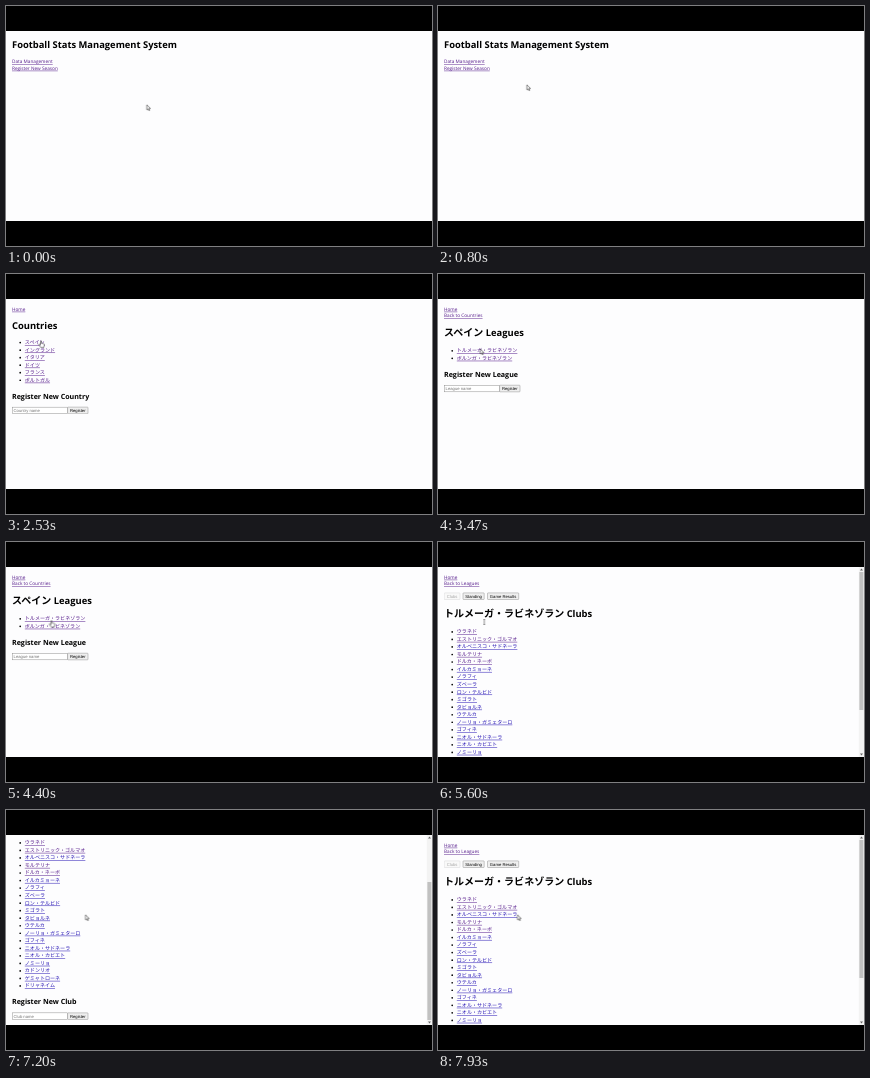
An HTML page for the animation above (8000 ms loop, 426 px wide and 240 px high).

```html
<!DOCTYPE html>
<html lang="ja">
<head>
<meta charset="utf-8">
<title>Football Stats Management System</title>
<style>
html, body { margin: 0; width: 100%; height: 100%; overflow: hidden; background: #000; }
svg { display: block; width: 100vw; height: 100vh; }
text { font-family: "Open Sans", "Noto Sans", sans-serif; fill: #111; text-rendering: geometricPrecision; white-space: pre; }
.jp { font-family: "Noto Sans CJK JP", "Noto Sans CJK", sans-serif; }
.bold { font-weight: 700; fill: #000; }
.link { fill: #2412b4; text-decoration: underline; text-decoration-thickness: .4px; }
.visited { fill: #551a8b; }
.control { font-family: "Liberation Sans", Arial, sans-serif; fill: #000; }
.hint { fill: #757575; }
.off { opacity: .35; }
.box { fill: #fff; stroke: #767676; stroke-width: .4; }
.button { fill: #efefef; }

.page, .shape { opacity: 0; animation: 8s step-end infinite; }
#home { animation-name: home; }
#countriesLoading { animation-name: countries-loading; }
#countries { animation-name: countries; }
#leaguesLoading { animation-name: leagues-loading; }
#leagues { animation-name: leagues; }
#clubsLoading { animation-name: clubs-loading; }
#clubs, #scrollbar { animation-name: clubs; }
#arrow { animation-name: arrow; }
#hand { animation-name: hand; }
#beam { animation-name: beam; }
@keyframes home { 0% { opacity: 1 } 18.5%, 100% { opacity: 0 } }
@keyframes countries-loading { 18.5% { opacity: 1 } 24% { opacity: 0 } }
@keyframes countries { 24% { opacity: 1 } 33.75% { opacity: 0 } }
@keyframes leagues-loading { 33.75% { opacity: 1 } 39% { opacity: 0 } }
@keyframes leagues { 39% { opacity: 1 } 56.5% { opacity: 0 } }
@keyframes clubs-loading { 56.5% { opacity: 1 } 62% { opacity: 0 } }
@keyframes clubs { 62%, 100% { opacity: 1 } }
@keyframes arrow { 0%, 25%, 33.75%, 71.5%, 100% { opacity: 1 } 13%, 28%, 46.5% { opacity: 0 } }
@keyframes hand { 13%, 28%, 46.5% { opacity: 1 } 18.5%, 33.75%, 56.5% { opacity: 0 } }
@keyframes beam { 18.5%, 56.5% { opacity: 1 } 25%, 71.5% { opacity: 0 } }

#cursor { animation: move 8s ease-in-out infinite; }
@keyframes move {
  0%, 6% { transform: translate(140.8px, 98.8px) }
  14%, 24% { transform: translate(37.5px, 59px) }
  29%, 36% { transform: translate(35px, 66.8px) }
  48%, 56.5% { transform: translate(45.5px, 78.5px) }
  58%, 70.5% { transform: translate(46.3px, 80px) }
  78%, 84% { transform: translate(79.5px, 103.5px) }
  90%, 100% { transform: translate(79.5px, 104.8px) }
}
#scroller { animation: scroll 8s linear infinite; }
#thumb { animation: thumb 8s linear infinite; }
@keyframes scroll {
  0%, 80% { transform: translateY(0) }
  82% { transform: translateY(-17px) }
  83.5% { transform: translateY(-31px) }
  86%, 92% { transform: translateY(-57px) }
  96%, 100% { transform: translateY(0) }
}
@keyframes thumb {
  0%, 80% { transform: translateY(0) }
  82% { transform: translateY(12.5px) }
  83.5% { transform: translateY(23px) }
  86%, 92% { transform: translateY(42px) }
  96%, 100% { transform: translateY(0) }
}
</style>
</head>
<body>
<svg viewBox="0 0 426 240" preserveAspectRatio="none">
  <rect y="25" width="426" height="190" fill="#fdfdfe"/>
  <g id="pages"></g>
  <g id="scrollbar" class="page">
    <rect x="420.8" y="25" width="5.2" height="190" fill="#f3f3f3"/>
    <rect id="thumb" x="421.4" y="30" width="4" height="138" fill="#c1c1c1"/>
    <path d="M422 28.4h3l-1.5-1.8zM422 211.6h3l-1.5 1.8z" fill="#666"/>
  </g>
  <path d="M0 0h426v25H0zM0 215h426v25H0z"/>
  <g id="cursor" fill="#fff" stroke="#000" stroke-width=".45" stroke-linejoin="round">
    <path id="arrow" class="shape" d="M0 0v5.1l1.2-1.1.8 1.8.9-.4-.8-1.7h1.6z"/>
    <path id="hand" class="shape" d="M-.5 .4q.5-.8 1 0v2l2.4.6q.6.2.5.9l-.5 2.6h-3.2l-2-2.8q.4-.8 1.1-.1l.7.6z"/>
    <path id="beam" class="shape" fill="none" d="M-1-2.6h.7l.3.3.3-.3h.7M0-2.3v4.6M-1 2.6h.7l.3-.3.3.3h.7"/>
  </g>
</svg>
<script>
const BODY = 4.72, H1 = 9.37, H2 = 7.1, CONTROL = 4.19;
const ROW = 7.53;

function add(parent, tag, attrs = {}) {
  const node = document.createElementNS("http://www.w3.org/2000/svg", tag);
  for (const key in attrs) node.setAttribute(key, attrs[key]);
  return parent.appendChild(node);
}

// y is the vertical middle of the capitals; Japanese runs are set slightly larger.
function write(parent, x, y, size, string, style = "") {
  const line = add(parent, "text", { x, y: y + size * .36, "font-size": size, class: style });
  for (const run of string.match(/[ -~]+|[^ -~]+/g)) {
    const japanese = run.charCodeAt(0) > 126;
    const span = add(line, "tspan", japanese ? { class: "jp", "font-size": size * 1.07 } : {});
    span.textContent = run;
  }
  return line;
}

const link = (parent, x, y, label, visited = true) =>
  write(parent, x, y, BODY, label, visited ? "link visited" : "link");

function button(parent, x, y, width, label, off = "") {
  const group = add(parent, "g", { class: off });
  add(group, "rect", { x, y: y - 3.3, width, height: 6.6, rx: .6, class: "box button" });
  write(group, x + width / 2, y, CONTROL, label, "control").setAttribute("text-anchor", "middle");
}

function form(parent, y, kind) {
  write(parent, 6, y, H2, "Register New " + kind, "bold");
  add(parent, "rect", { x: 6.2, y: y + 11.2, width: 55.2, height: 6.6, class: "box" });
  write(parent, 7.6, y + 14.5, CONTROL, kind + " name", "control hint");
  button(parent, 61.6, y + 14.5, 20.4, "Register");
}

const pages = document.getElementById("pages");
const newPage = id => add(pages, "g", { id, class: "page" });

function listPage(id, { back, tabs, title, titleY, listY, kind, items, unvisited = [] }) {
  let page = newPage(id);
  if (id === "clubs") page = add(page, "g", { id: "scroller" });
  link(page, 6, 35, "Home");
  if (back) link(page, 6, 41.5, back);
  if (tabs) {
    button(page, 6.2, 54.2, 15.8, "Clubs", "off");
    button(page, 25, 54.2, 21.2, "Standing");
    button(page, 49.5, 54.2, 31.2, "Game Results");
  }
  write(page, 6, titleY, H1, title, "bold");
  if (!items) {
    write(page, 6, listY, BODY, "Loading...");
    form(page, listY + 15, kind);
    return;
  }
  items.forEach((name, i) => {
    const y = listY + i * ROW;
    add(page, "circle", { cx: 14.2, cy: y + .3, r: .85 });
    link(page, 18.8, y, name, !unvisited.includes(i));
  });
  form(page, listY + (items.length - 1) * ROW + 16, kind);
}

function withLoading(id, options) {
  listPage(id + "Loading", { ...options, items: null });
  listPage(id, options);
}

const home = newPage("home");
write(home, 6, 39, H1, "Football Stats Management System", "bold");
link(home, 6, 55.5, "Data Management");
link(home, 6, 62, "Register New Season");

withLoading("countries", {
  title: "Countries", titleY: 51.7, listY: 68.3, kind: "Country",
  items: ["スペイン", "イングランド", "イタリア", "ドイツ", "フランス", "ポルトガル"]
});

withLoading("leagues", {
  back: "Back to Countries",
  title: "スペイン Leagues", titleY: 58.5, listY: 76.5, kind: "League",
  items: ["トルメーガ・ラビネゾラン", "ボルンガ・ラビネゾラン"]
});

withLoading("clubs", {
  back: "Back to Leagues", tabs: true,
  title: "トルメーガ・ラビネゾラン Clubs", titleY: 71.6, listY: 89.6, kind: "Club",
  items: [
    "ウラネド", "エストリニック・ゴルマオ", "オルベニスコ・サドネーラ", "モルテリナ",
    "ドルカ・ネーボ", "イルカミョーネ", "ノラフィ", "ズベーラ", "ロン・テルビド",
    "ミゴラト", "タビョルネ", "ウテルカ", "ノーリョ・ガミェターロ", "ゴフィネ",
    "ニオル・サドネーラ", "ニオル・カビエト", "ノミーリョ", "カドンリオ",
    "ゲミャトローネ", "ドリャネイム"
  ],
  unvisited: [2, 5, 6, 7, 8, 9, 10, 11, 12, 13, 14, 15, 16, 17, 18, 19]
});
</script>
</body>
</html>
```
